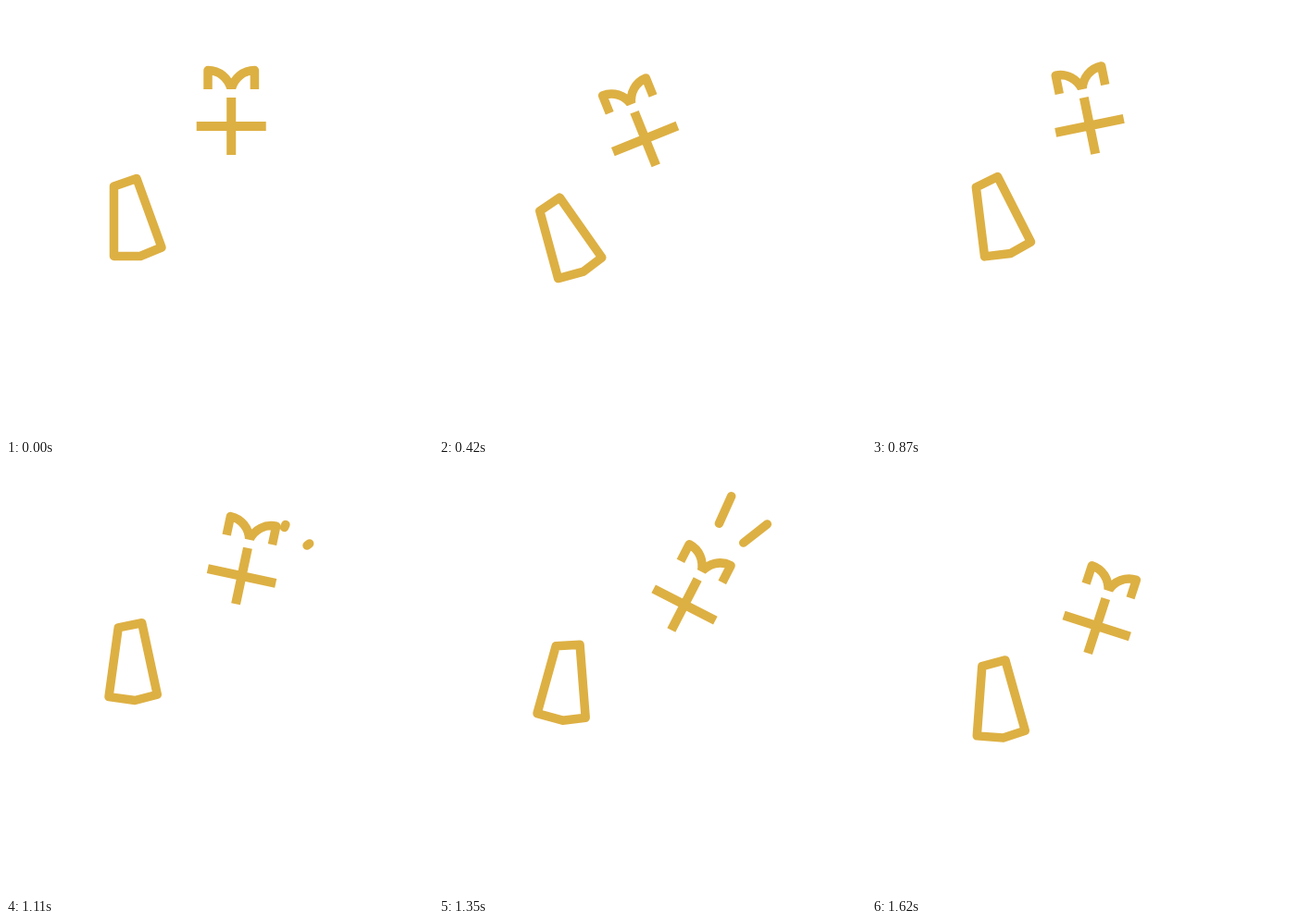
Write an HTML page that moves like this. It is 461 px wide and 466 px high and loops after 1650 ms.

```html
<!DOCTYPE html>
<html lang="en">
<head>
<meta charset="utf-8">
<title>Gift</title>
<style>
  html, body { margin: 0; width: 100%; height: 100%; overflow: hidden; background: #fff; }
  svg { display: block; width: 100%; height: 100%; }
  .ink { fill: none; stroke: #ddb043; stroke-width: 9.5; stroke-linejoin: round; }
  .ray { stroke-linecap: round; }
</style>
</head>
<body>
<svg viewBox="0 0 461 466">
  <defs>
    <clipPath id="aboveLid"><rect x="-50" y="-80" width="100" height="40"/></clipPath>
  </defs>
  <g class="ink">
    <path id="cuff" d="M-20.9-41.7 3.6-50.2 30.6 24.3 7.6 33.8H-20.9Z"/>
    <g id="gift">
      <path stroke-width="10" d="M0-31V31M-37.5 0H37.5"/>
      <path clip-path="url(#aboveLid)" d="M-25.2-38V-60.5C-13-60.5-3-52 0-40C3-52 13-60.5 25.2-60.5V-38"/>
    </g>
    <path class="ray"/>
    <path class="ray"/>
  </g>
</svg>
<script>
const LOOP = 1650, STEP = 30, CYCLE = 1600;

// cuff x, y, angle, then gift x, y, angle
const REST = [137.4, 236.7, 0, 243.2, 130, 0];
const SWING = [
  [20, 136.6, 260.7, 4.2, 242.7, 174, 18],
  [240, 138.4, 247.5, -6.8, 233.5, 137, -9.3],
  [540, 140.4, 261, -18, 218.5, 149.5, -25],
  [630, 140.2, 258, -17.4, 219.5, 146.5, -24.2],
  [870, 138.2, 234.8, -7, 235, 129.3, -11.5],
  [1110, 136.3, 220, 7.8, 254.5, 120, 12],
  [1350, 135.2, 241.6, 15.5, 265, 151, 27.2]
];
const RAYS = [
  [300.5, 67.5, 316, 33],
  [325, 87, 355, 63.5]
];

const cuff = document.getElementById("cuff");
const gift = document.getElementById("gift");
const rays = document.querySelectorAll(".ray");

const mix = (a, b, u) => a + (b - a) * u;

function ease(t, from, to) {
  const u = Math.min(1, Math.max(0, (t - from) / (to - from)));
  return u * u * (3 - 2 * u);
}

// Knots repeat once per cycle, so any index is valid.
function knot(i) {
  const n = SWING.length, lap = Math.floor(i / n);
  const [t, ...pose] = SWING[i - lap * n];
  return { t: t + lap * CYCLE, pose };
}

// Slope of the parabola through a knot and its neighbours.
function slope(a, b, c, k) {
  const h0 = b.t - a.t, h1 = c.t - b.t;
  const d0 = (b.pose[k] - a.pose[k]) / h0, d1 = (c.pose[k] - b.pose[k]) / h1;
  return (d0 * h1 + d1 * h0) / (h0 + h1);
}

function poseAt(t) {
  if (t < STEP) return REST;
  let i = 0;
  while (knot(i + 1).t <= t) i++;
  const [a, b, c, d] = [-1, 0, 1, 2].map(o => knot(i + o));
  const h = c.t - b.t, u = (t - b.t) / h, v = 1 - u;
  return b.pose.map((p, k) =>
    p * (1 + 2 * u) * v * v + c.pose[k] * u * u * (3 - 2 * u) +
    h * u * v * (v * slope(a, b, c, k) - u * slope(b, c, d, k)));
}

function place(el, x, y, angle) {
  el.setAttribute("transform", `translate(${x} ${y}) rotate(${angle})`);
}

function draw(t) {
  const p = poseAt(t);
  place(cuff, p[0], p[1], p[2]);
  place(gift, p[3], p[4], p[5]);

  const head = ease(t, 1050, 1380), tail = ease(t, 1280, 1600);
  rays.forEach((ray, i) => {
    const [x0, y0, x1, y1] = RAYS[i];
    const at = u => `${mix(x0, x1, u)} ${mix(y0, y1, u)}`;
    ray.setAttribute("d", head > tail ? `M${at(tail)}L${at(head)}` : "");
  });
}

const start = performance.now();
function tick() {
  const t = (performance.now() - start) % LOOP;
  draw(Math.floor(t / STEP) * STEP);
  requestAnimationFrame(tick);
}
tick();
</script>
</body>
</html>
```
